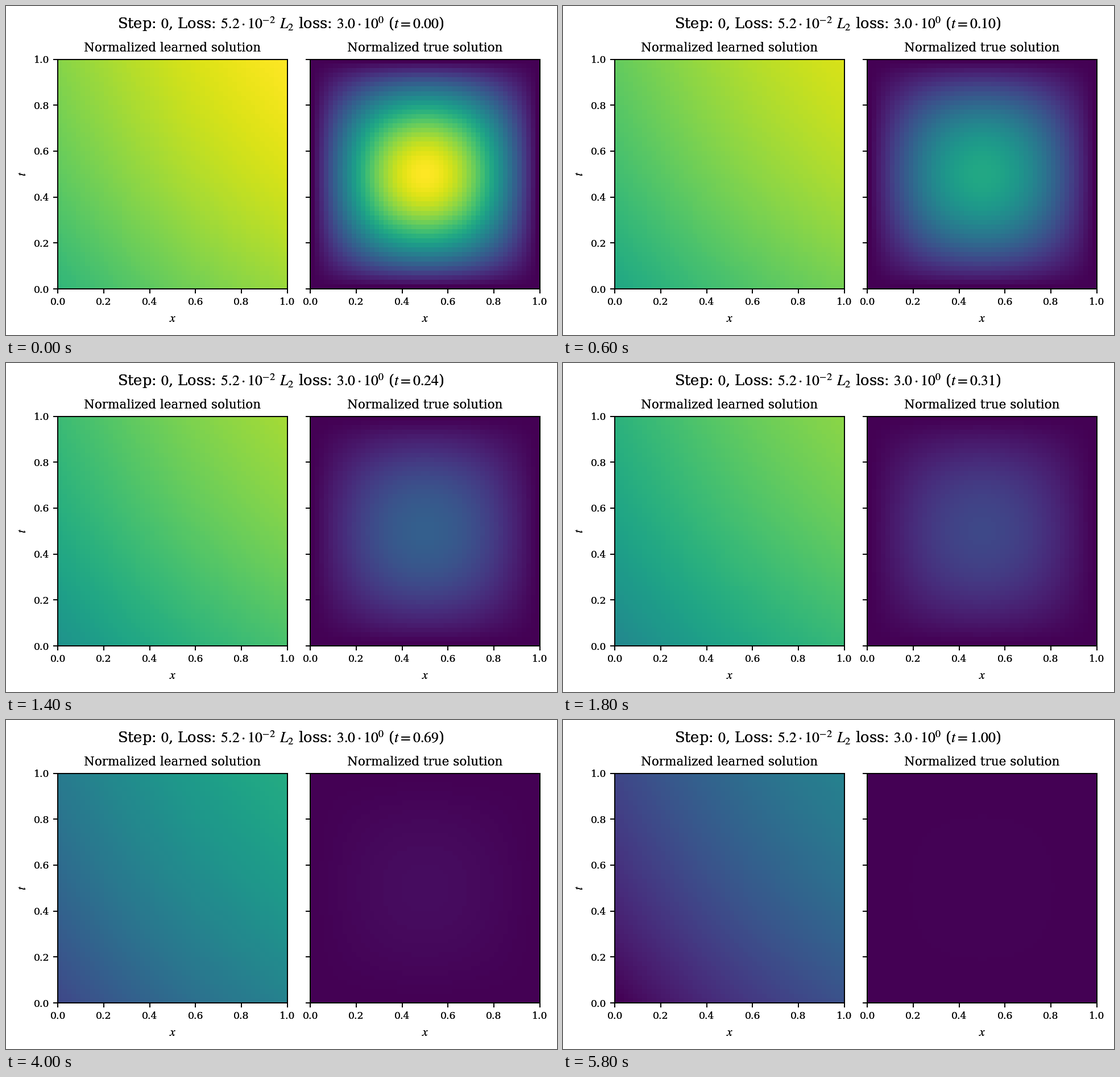
A matplotlib script that plays this animation: 969x578 px, repeating every 6000 ms.

```python
import matplotlib.pyplot as plt
import numpy as np
from matplotlib.animation import FuncAnimation

W, H, DPI = 969, 578, 155
FRAMES, INTERVAL = 30, 200
CELLS = 50
SIDE, BOTTOM = 403.4, 497
PASSES = 2  # ink is laid down twice for a firmer weight

plt.rcParams.update({
    "font.family": "DejaVu Serif",
    "mathtext.fontset": "stix",
    "font.size": 10,
    "axes.titlesize": 10,
    "axes.titlepad": 6.4,
    "axes.labelsize": 10,
    "xtick.labelsize": 8,
    "ytick.labelsize": 8,
})

grid = np.linspace(0, 1, CELLS)
X, Y = np.meshgrid(grid, grid)


def learned(t):
    """Smooth surface blended from four corner values that sink with time."""
    c00 = 0.66 - 0.60 * t - 0.06 * t**2
    c10 = 0.85 - 0.57 * t - 0.03 * t**2
    c01 = 0.82 - 0.55 * t - 0.06 * t**2
    c11 = 1.00 - 0.56 * t
    plane = (c00 * (1 - X) + c10 * X) * (1 - Y) + (c01 * (1 - X) + c11 * X) * Y
    return plane + 0.017 * (np.sin(np.pi * X) + np.sin(np.pi * Y))


def exact(t):
    """Decaying heat mode."""
    return np.sin(np.pi * X) * np.sin(np.pi * Y) * np.exp(-np.pi**2 / 2 * t)


def caption(t):
    return (r"Step: $0$, Loss: $5.2\cdot 10^{-2}$ $L_2$ loss: $3.0\cdot 10^{0}$"
            rf" ($t={t:.2f}$)")


def add_panel(left, title, ylabel=None):
    rect = [left / W, (H - BOTTOM) / H, SIDE / W, SIDE / H]
    layers = [fig.add_axes(rect, facecolor="none") for _ in range(PASSES)]
    im = layers[0].imshow(np.zeros((CELLS, CELLS)), origin="lower",
                          extent=(0, 1, 0, 1), vmin=0, vmax=1, cmap="viridis",
                          interpolation="nearest", aspect="auto")
    for ax in layers:
        ax.set(xlim=(0, 1), ylim=(0, 1), title=title, xlabel="$x$")
        if ylabel:
            ax.set_ylabel(ylabel)
        else:
            ax.tick_params(labelleft=False)
    return im


fig = plt.figure(figsize=(W / DPI, H / DPI), dpi=DPI, facecolor="white")
im_left = add_panel(91.2, "Normalized learned solution", "$t$")
im_right = add_panel(535.2, "Normalized true solution")
heads = [fig.text(483.2 / W, (H - 39.5) / H, caption(0), fontsize=11.94,
                  ha="center", va="baseline") for _ in range(PASSES)]


def update(i):
    t = i / (FRAMES - 1)
    im_left.set_data(learned(t))
    im_right.set_data(exact(t))
    for head in heads:
        head.set_text(caption(t))
    return im_left, im_right, *heads


anim = FuncAnimation(fig, update, frames=FRAMES, interval=INTERVAL,
                     repeat=True, repeat_delay=0)
plt.show()
```
